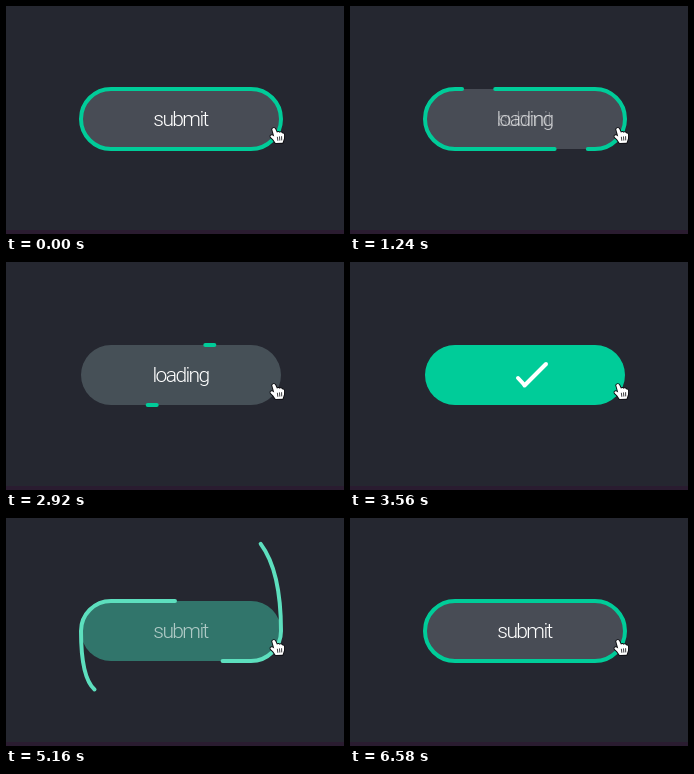
Animation of 338 by 228 pixels, one loop 7.12 s. Source, as an HTML page with a canvas:

```html
<!DOCTYPE html>
<html lang="en">
<head>
<meta charset="utf-8">
<title>Submit button</title>
<style>
  html, body { margin: 0; width: 100%; height: 100%; overflow: hidden; background: #252730; }
  canvas { display: block; width: 338px; height: 228px; }
</style>
</head>
<body>
<canvas id="stage" width="338" height="228"></canvas>
<script>
const ctx = document.getElementById('stage').getContext('2d');
const LOOP = 7120;
const CLICK = 1020, FLY = 2920, DONE = 3560, BACK = 4880, REST = 5620;
const GRAY = [72, 76, 85], GREEN = [0, 204, 153], WHITE = [255, 255, 255];
const HALF = Math.PI * 30 + 140;
const SPEED = 0.665;

const clamp = x => Math.max(0, Math.min(1, x));
const span = (t, a, b) => clamp((t - a) / (b - a));
const smooth = p => p * p * (3 - 2 * p);
const lerp = (a, b, p) => a + (b - a) * p;
const mix = (a, b, p) => `rgb(${a.map((v, i) => Math.round(lerp(v, b[i], p))).join(',')})`;

// cubic-bezier(.25, .1, .25, 1)
function ease(x) {
  let lo = 0, hi = 1;
  for (let i = 0; i < 24; i++) {
    const u = (lo + hi) / 2, v = 1 - u;
    if (0.75 * v * v * u + 0.75 * v * u * u + u * u * u < x) lo = u; else hi = u;
  }
  const v = 1 - lo;
  return 0.3 * v * v * lo + 3 * v * lo * lo + lo * lo * lo;
}

function pathLength(d) {
  const p = document.createElementNS('http://www.w3.org/2000/svg', 'path');
  p.setAttribute('d', d);
  return p.getTotalLength();
}

// Each line runs from one arm of the check to one half of the outline.
function makeLine(arm, lead, half, power) {
  return {
    path: new Path2D(arm + lead + half),
    arm: pathLength(arm),
    lead: pathLength(arm + lead),
    power
  };
}

const topHalf = 'A30 30 0 0 1 105 83H245A30 30 0 0 1 275 113';
const bottomHalf = 'A30 30 0 0 1 245 143H105A30 30 0 0 1 75 113';
const outline = new Path2D('M75 113' + topHalf + bottomHalf + 'Z');
const lines = [
  makeLine('M196 102L174.5 123.5', 'C120 177 75 212 75 113', topHalf, 1.55),
  makeLine('M174.5 123L168 116', 'C98 46 275 -88 275 113', bottomHalf, 1.3)
];

function strokePart(path, start, length, gap) {
  ctx.setLineDash([length, gap]);
  ctx.lineDashOffset = -start;
  ctx.stroke(path);
  ctx.setLineDash([]);
}

function drawLoader(t) {
  const length = lerp(HALF, 9, span(t, CLICK, CLICK + 1500));
  const start = -((t - CLICK) * SPEED % HALF);
  strokePart(outline, start, length, HALF - length);
}

function drawFlight(t) {
  const p = span(t, FLY, DONE);
  const from = HALF - (FLY - CLICK) * SPEED % HALF;
  for (const l of lines) {
    const start = (l.lead + from) * Math.pow(1 - p, l.power);
    strokePart(l.path, start, lerp(9, l.arm, p), 2000);
  }
}

function drawReturn(t) {
  const p = span(t, BACK - 30, REST);
  for (const l of lines) {
    const tail = l.lead * ease(p);
    const head = lerp(l.arm, l.lead + HALF, smooth(clamp(p / 0.64)));
    strokePart(l.path, tail, head - tail, 2000);
  }
}

function drawLabel(text, alpha) {
  if (alpha <= 0) return;
  ctx.globalAlpha = alpha;
  ctx.fillStyle = '#fff';
  ctx.fillText(text, 174.5, 120.3);
  ctx.globalAlpha = 1;
}

const hand = new Path2D(
  'M266.2 123.2C267 121.6 268.8 121.8 269.4 123.2L270.9 126.6' +
  'C271.9 125.6 273.1 125.8 273.6 126.8C274.7 126 275.8 126.4 276.2 127.4' +
  'C277.4 127.2 278.1 128 278.1 129.2L278 132.4L276.6 136.8L269.6 136.9' +
  'L267.2 133.6L264.6 131C264 129.6 265.4 128.8 266.6 129.6L268.2 130.6Z');
const knuckles = new Path2D('M271.4 131.2L271.8 134.4M273.5 130.8L273.8 134.2M275.6 130.6L275.7 134');

function drawCursor() {
  ctx.strokeStyle = '#0b0b0f';
  ctx.lineWidth = 1.8;
  ctx.stroke(hand);
  ctx.fillStyle = '#fff';
  ctx.fill(hand);
  ctx.lineWidth = 0.8;
  ctx.stroke(knuckles);
}

function draw(t) {
  ctx.fillStyle = '#252730';
  ctx.fillRect(0, 0, 338, 228);
  ctx.fillStyle = '#2a1c30';
  ctx.fillRect(0, 224, 338, 4);

  const back = t >= BACK;
  const tint = t > BACK ? 1 - ease(span(t, BACK - 20, REST)) : smooth(span(t, 2850, DONE));
  ctx.fillStyle = mix(GRAY, GREEN, tint);
  ctx.fill(outline);

  const swap = span(t, CLICK, CLICK + 320);
  drawLabel('submit', back ? span(t, BACK + 60, BACK + 420) : 1 - swap);
  drawLabel('loading', swap * (1 - span(t, FLY, FLY + 240)));

  const white = back ? 1 - span(t, BACK + 40, BACK + 420) : span(t, 3080, 3400);
  ctx.strokeStyle = mix(GREEN, WHITE, white);
  ctx.lineWidth = 4;
  if (t < CLICK || t >= REST) ctx.stroke(outline);
  else if (t < FLY) drawLoader(t);
  else if (t < BACK) drawFlight(t);
  else drawReturn(t);

  drawCursor();
}

ctx.lineCap = ctx.lineJoin = 'round';
ctx.textAlign = 'center';
ctx.font = '300 21px Roboto, "Liberation Sans", sans-serif';
ctx.letterSpacing = '-1.6px';

const begin = performance.now();
function tick() {
  draw((performance.now() - begin) % LOOP);
  requestAnimationFrame(tick);
}
tick();
</script>
</body>
</html>
```
